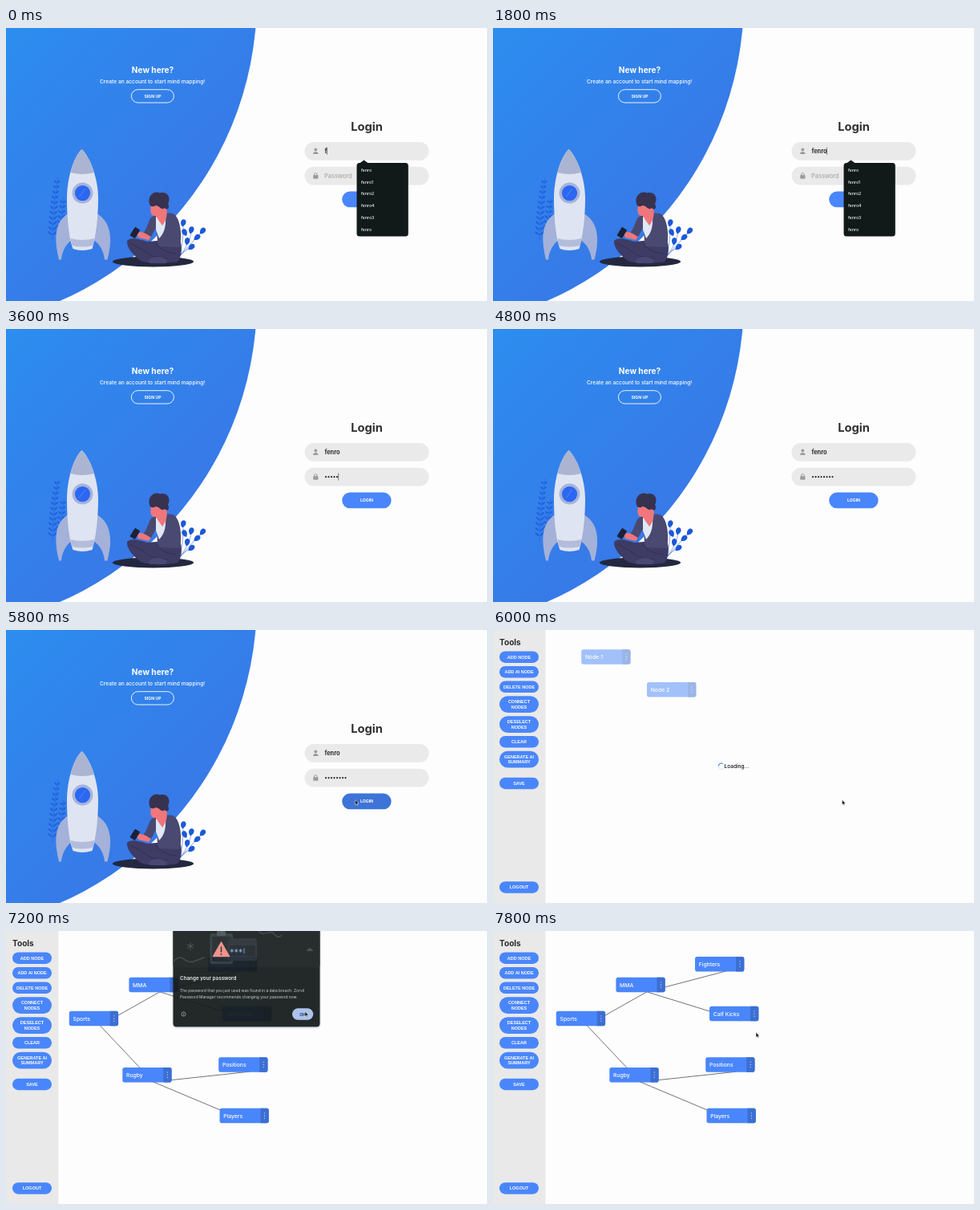
An HTML page that plays this animation: 600 px wide and 340 px high, repeating every 8000 ms.

```html
<!DOCTYPE html>
<html lang="en">
<head>
<meta charset="utf-8">
<title>Mind map login</title>
<style>
  html, body { margin: 0; width: 100%; height: 100%; overflow: hidden; background: #fdfdfd; }
  svg { display: block; width: 100%; height: 100%; }
  text { font-family: Inter, "Open Sans", sans-serif; }
  .button { font: bold 5.5px "Liberation Sans", Arial, sans-serif; }
</style>
</head>
<body>
<svg id="stage" viewBox="0 0 600 340" xmlns="http://www.w3.org/2000/svg"></svg>
<script>
const LOOP = 8000, STEP = 200;
const BLUE = '#4a86fb', USER = 'fenro';

const rect = (x, y, w, h, r, fill, extra = '') =>
  `<rect x="${x}" y="${y}" width="${w}" height="${h}" rx="${r}" fill="${fill}" ${extra}/>`;
const circle = (x, y, r, fill, extra = '') =>
  `<circle cx="${x}" cy="${y}" r="${r}" fill="${fill}" ${extra}/>`;
const path = (d, fill, extra = '') => `<path d="${d}" fill="${fill}" ${extra}/>`;
const line = (d, color, width, extra = '') =>
  path(d, 'none', `stroke="${color}" stroke-width="${width}" stroke-linecap="round" ${extra}`);
const text = (s, x, y, size, weight, fill, extra = '') =>
  `<text x="${x}" y="${y}" font-size="${size}" font-weight="${weight}" fill="${fill}" ${extra}>${s}</text>`;
const MIDDLE = 'text-anchor="middle"';
const group = (id, body, extra = '') => `<g id="${id}" ${extra}>${body}</g>`;
const times = (n, fn) => Array.from({ length: n }, (_, i) => fn(i)).join('');

// Fern: a bent stem with paired leaves that shrink towards the tip
function fern(x, y, height, lean, pairs) {
  const leaves = times(pairs, i => {
    const u = (i + 1) / (pairs + 1);
    const px = x + lean * u * u, py = y - height * u, size = 3.4 - 1.6 * u;
    return [-1, 1].map(side =>
      `<ellipse cx="${px + side * size}" cy="${py - 2}" rx="${size}" ry="1" fill="#205edf"
        transform="rotate(${-side * 42} ${px + side * size} ${py - 2})"/>`).join('');
  });
  return line(`M${x} ${y}Q${x} ${y - height / 2} ${x + lean} ${y - height}`, '#205edf', .6) + leaves;
}

function rocket() {
  return fern(58, 264, 77, 7, 11) + fern(68, 262, 50, 4, 7) +
    path('M78 231C66 238 57 252 66 288.5H69C70 277 76 268 82 264Z', '#a4b1d9') +
    path('M113 231C125 238 136 252 126.5 288.5H123C122 277 116 268 109 264Z', '#a4b1d9') +
    path('M94.5 151C105 161 115 188 115 212C115 240 111 264 107.5 275Q95 279 83.5 275C79 264 76 240 76 212C76 188 84 161 94.5 151Z', '#dfe4f2') +
    path('M94.5 151C101 157 107 169 110 180Q95 184 80.5 180C83 169 88 157 94.5 151Z', '#abb5d2') +
    path('M80.5 262Q95 266 110.5 262L108.5 271Q95 274 82.5 271Z', '#b3bddb') +
    circle(95.5, 205.6, 13, '#a6b4da') + circle(95.5, 205.6, 9.6, '#2c67f2') +
    line('M91.5 210L98.500 200.500', '#5b8df8', .8);
}

function plant() {
  const leaves = [[221, 243, 15], [231, 252, 15], [223, 255, -25], [245, 253, 40],
    [238, 261, 50], [226, 266, 10], [231, 273, 50]];
  return line('M216 286Q222 264 221 246M217 284Q229 268 231 255M218 283Q232 267 243 255M218 282Q226 275 230 274', '#215fd9', .5) +
    leaves.map(([x, y, a]) =>
      path('M0 4.500C-4.500 1 -4 -4.500 0 -5C4 -4.500 4.500 1 0 4.500Z', '#1c58d8', `transform="translate(${x} ${y}) rotate(${a})"`)).join('');
}

function reader() {
  return plant() +
    `<ellipse cx="183.5" cy="291" rx="50.5" ry="6.4" fill="#232840"/>` +
    path('M151 265C156 260 166 263 176 266L200 264L216 262C221 272 219 286 214 291C200 294 178 294 168 290C160 284 150 274 151 265Z', '#3e3b65') +
    path('M180 237C186 231 203 229 210 232C217 238 220 255 217 273L191 272C187 264 190 256 187 249L180 262L170 257C175 251 177 244 180 237Z', '#4a4971') +
    path('M187 235L199 233C200 248 197 256 191 262L187 251Z', '#e0e8f6') +
    path('M181 221C179 229 181 235 187 234L190 239L195 246C200 240 202 232 200 221L192 215Z', '#ef777b') +
    path('M179 219C176 209 185 202 192 205.500C202 203 206 212 202 219C205 224 201 228 198 224C194 228 191 221 187 221C183 223 180 223 179 219Z', '#37324f') +
    path('M163 255C169 252 174 256 181 260L178 264L165 261Z', '#ef777b') +
    rect(157, 248.5, 7.5, 12.5, 1.2, '#1d2136', 'transform="rotate(32 160.5 255)"') +
    line('M155 268Q168 274 182 284L201 287M187 268Q193 279 212 281', '#302d50', .8) +
    path('M177 290C184 283 194 284 201 289L199 293H180Z', '#4b4774');
}

function field(y) {
  return rect(372.5, y, 155, 22.8, 11.4, '#eaeaea');
}

function dropdown() {
  return path('M441 168.5L446.5 164.5L452 168.5Z', '#121a19') +
    rect(437.5, 168, 64.3, 91.5, 3.5, '#121a19') +
    ['', 1, 2, 4, 3, ''].map((n, i) => text(USER + n, 443, 179 + i * 14.7, 5.2, 500, '#f4f6f5')).join('');
}

function login() {
  return circle(-96, -34.9, 408.8, 'url(#sky)') +
    text('New here?', 183, 56, 10.1, 700, '#fff', MIDDLE) +
    text('Create an account to start mind mapping!', 182.7, 69.2, 6.65, 500, '#fff', MIDDLE) +
    rect(156.4, 76.7, 53, 16.3, 8.1, 'none', 'stroke="#fff" stroke-width=".9"') +
    text('SIGN UP', 183, 86.8, 5.2, 700, '#fff', MIDDLE) +
    rocket() + reader() +
    text('Login', 450, 128, 14.7, 700, '#303030', MIDDLE) +
    field(142) + field(172.7) +
    circle(386.3, 151.4, 1.9, '#9b9b9b') + path('M383 157C383 153 389.6 153 389.6 157Z', '#9b9b9b') +
    rect(383.2, 183.2, 6.2, 4.6, .8, '#9b9b9b') +
    line('M384.6 183.5V182Q386.3 178.8 388 182V183.5', '#9b9b9b', 1) +
    text('', 397.4, 156, 7.4, 700, '#303030', 'id="user"') +
    text('Password', 397, 186.7, 7.4, 500, '#a9a9a9', 'id="placeholder"') +
    group('dots', times(8, i => circle(399 + i * 3.5, 184.2, 1.1, '#303030'))) +
    rect(0, 0, .6, 9, 0, '#303030', 'id="caret"') +
    rect(419.2, 203.5, 61.4, 19.8, 9.9, BLUE, 'id="submit"') +
    text('LOGIN', 450, 215.3, 5.2, 700, '#fff', MIDDLE) +
    group('dropdown', dropdown());
}

function sidebar() {
  const buttons = [[26.4, 'ADD NODE'], [45, 'ADD AI NODE'], [63.6, 'DELETE NODE'], [82.2, 'CONNECT', 'NODES'],
    [107.2, 'DESELECT', 'NODES'], [132, 'CLEAR'], [150.8, 'GENERATE AI', 'SUMMARY'], [183.7, 'SAVE'], [313.2, 'LOGOUT']];
  return rect(0, 0, 65.3, 340, 0, '#e9e9e9') + text('Tools', 8, 18.8, 10.1, 700, '#2b2b2b') +
    buttons.map(([y, ...lines]) => {
      const h = lines.length > 1 ? 20.8 : 14.5;
      return rect(8, y, 49, h, h / 2, BLUE) + lines.map((s, i) =>
        `<text class="button" x="32.5" y="${y + 9.2 + i * 6.3}" fill="#fff" ${MIDDLE}>${s}</text>`).join('');
    }).join('');
}

function node(label, x, y) {
  return rect(x, y, 61.3, 18.5, 2.8, BLUE) +
    path(`M${x + 51} ${y}h7.5q2.8 0 2.8 2.8v12.9q0 2.8 -2.8 2.8h-7.5z`, '#3c6fd2') +
    times(3, i => circle(x + 56, y + 6 + i * 3.2, .65, '#c9dafc')) +
    text(label, x + 4.7, y + 11.7, 6.8, 500, '#fff');
}

function mindMap() {
  const nodes = {
    Sports: [78.8, 99.8], MMA: [153.4, 57.8], Fighters: [252, 32], 'Calf Kicks': [270, 93.8],
    Rugby: [145.3, 170], Positions: [265.2, 157.2], Players: [266.5, 220.8]
  };
  const edges = [['Sports', 'MMA'], ['Sports', 'Rugby'], ['MMA', 'Fighters'], ['MMA', 'Calf Kicks'],
    ['Rugby', 'Positions'], ['Rugby', 'Players']];
  const anchor = name => `${nodes[name][0] + 38.5} ${nodes[name][1] + 18}`;
  return edges.map(([a, b]) => line(`M${anchor(a)}L${anchor(b)}`, '#5a5a5a', .85)).join('') +
    Object.entries(nodes).map(([name, p]) => node(name, ...p)).join('');
}

function loading() {
  return `<g opacity=".5">${node('Node 1', 110.2, 24.3)}${node('Node 2', 192, 65)}</g>` +
    circle(285, 169.8, 3.7, 'none', 'stroke="#dfe6f5" stroke-width="1"') +
    line('M285 166.1A3.7 3.7 0 0 1 288.7 169.8', '#3c7af0', 1.1, 'id="spinner"') +
    text('Loading...', 288.6, 172.3, 6.5, 500, '#111');
}

function popup() {
  const star = (x, y, r, color, w) => times(3, i => {
    const a = Math.PI * (i / 3 + .5), dx = r * Math.cos(a), dy = r * Math.sin(a);
    return line(`M${x - dx} ${y - dy}L${x + dx} ${y + dy}`, color, w);
  });
  return rect(208.5, -8, 183, 128.3, 4, '#141b1b', 'filter="url(#shadow)"') +
    rect(208.5, -8, 183, 54.5, 4, '#1b2122') +
    line('M209 39Q216 31 222 36T234 39T247 34M314 -2C320 12 329 -2 334 4S341 9 344 6', '#3a4143', 1.5) +
    star(230, 20, 4.3, '#4a5153', 1) +
    rect(254.5, 4, 28.5, 38, 2.5, '#343b3e') + rect(257, 8, 23.5, 31, 1, '#22292b') +
    rect(263, 1, 11, 6, 1.5, '#4a5255') +
    rect(277, 10, 36, 28, 2, '#2a3136') + rect(279, 19, 32, 13, 1.5, '#20272c') +
    path('M268.5 15L278.5 32.5H258.5Z', '#ee8d88', 'stroke="#ee8d88" stroke-width="1.5" stroke-linejoin="round"') +
    line('M268.5 21V27', '#272d2f', 1.5) + circle(268.5, 30, .9, '#272d2f') +
    times(3, i => star(281.8 + i * 5.4, 25.5, 1.8, '#8ab4f8', .8)) + line('M297 23V28.5', '#8ab4f8', .8) +
    path('M375 26Q375 23.5 377 23.5Q379 20.5 381 23.5Q383 23.5 383 26Z', '#42494b') +
    text('Change your password', 217, 62, 6.3, 600, '#e6eaea') +
    text('The password that you just used was found in a data breach. Zorvil', 217, 77, 4.9, 400, '#c9cfcf') +
    text('Password Manager recommends changing your password now.', 217, 85.2, 4.9, 400, '#c9cfcf') +
    circle(221.5, 104.5, 2.6, 'none', 'stroke="#c9cfcf" stroke-width=".6"') +
    line('M221.5 104.4V105.8M221.5 103.1V103.2', '#c9cfcf', .5) +
    rect(357, 97.3, 26.3, 14.5, 7.25, '#a8c6fa', 'id="ok"') +
    text('OK', 370.2, 106.6, 5.4, 600, '#0c2c66', MIDDLE);
}

const stage = document.getElementById('stage');
stage.innerHTML = `<defs>
  <linearGradient id="sky" gradientUnits="userSpaceOnUse" x1="0" y1="0" x2="210" y2="210">
    <stop offset="0" stop-color="#2c8def"/><stop offset="1" stop-color="#377ae8"/></linearGradient>
  <filter id="shadow" x="-10%" y="-10%" width="120%" height="120%">
    <feDropShadow dx="0" dy="1" stdDeviation="1.2" flood-opacity=".3"/></filter></defs>` +
  rect(0, 0, 600, 340, 0, '#fdfdfd') + group('login', login()) +
  group('app', group('loading', loading()) + group('map', mindMap()) + sidebar() + group('popup', popup())) +
  group('cursor', path('M0 0V6.2L1.5 4.9L2.5 7L3.5 6.5L2.5 4.5H4.5Z', '#111', 'stroke="#fff" stroke-width=".5"'));

const el = {};
stage.querySelectorAll('[id]').forEach(e => el[e.id] = e);
const show = (e, on) => { e.style.display = on ? '' : 'none'; };

const cursorKeys = [[5000, 449, 204], [5400, 435.4, 211.6], [6400, 435.4, 211.6], [7000, 377, 104],
  [7200, 373, 100.3], [7400, 370, 102], [7800, 328, 126.3]];

function cursorAt(t) {
  const i = Math.max(1, cursorKeys.findIndex(k => k[0] >= t));
  const [t0, x0, y0] = cursorKeys[i - 1], [t1, x1, y1] = cursorKeys[i];
  const u = Math.min(1, Math.max(0, (t - t0) / (t1 - t0))), e = u * u * (3 - 2 * u);
  return [x0 + (x1 - x0) * e, y0 + (y1 - y0) * e];
}

function render(t) {
  const inApp = t >= 6000, onPassword = t >= 2600;
  show(el.login, !inApp);
  show(el.app, inApp);

  if (!inApp) {
    const letters = Math.min(USER.length, 1 + Math.floor(t / 200));
    const dots = Math.max(0, Math.min(8, Math.floor((t - 2600) / 200)));
    el.user.textContent = USER.slice(0, letters);
    [...el.dots.children].forEach((dot, i) => show(dot, i < dots));
    show(el.placeholder, dots === 0);
    show(el.dropdown, !onPassword);

    const lastKey = onPassword ? Math.min(t, 4200) : Math.min(t, 800);
    const caretX = onPassword ? 397 + dots * 3.5 : 397 + el.user.getComputedTextLength();
    el.caret.setAttribute('x', caretX);
    el.caret.setAttribute('y', onPassword ? 179.6 : 148.8);
    show(el.caret, (t - lastKey) % 1000 < 500 && t < 5400);
    el.submit.setAttribute('fill', t >= 5000 ? '#3e73d8' : BLUE);
  } else {
    const loaded = t >= 6600, leaving = t >= 7200;
    show(el.loading, !loaded);
    show(el.map, loaded);
    el.spinner.setAttribute('transform', `rotate(${(t - 6200) * .36} 285 169.8)`);
    show(el.popup, t >= 6200 && t < 7400);
    el.popup.setAttribute('opacity', leaving ? .94 : 1);
    el.popup.setAttribute('transform', `translate(0 ${leaving ? -1 : 0})`);
    el.ok.setAttribute('fill', t >= 7000 ? '#a9c0ea' : '#a8c6fa');
  }

  show(el.cursor, t >= 5000);
  el.cursor.setAttribute('transform', `translate(${cursorAt(t)})`);
}

const start = performance.now();
function tick() {
  const t = (performance.now() - start) % LOOP;
  render(Math.floor(t / STEP) * STEP);
  requestAnimationFrame(tick);
}
tick();
</script>
</body>
</html>
```
